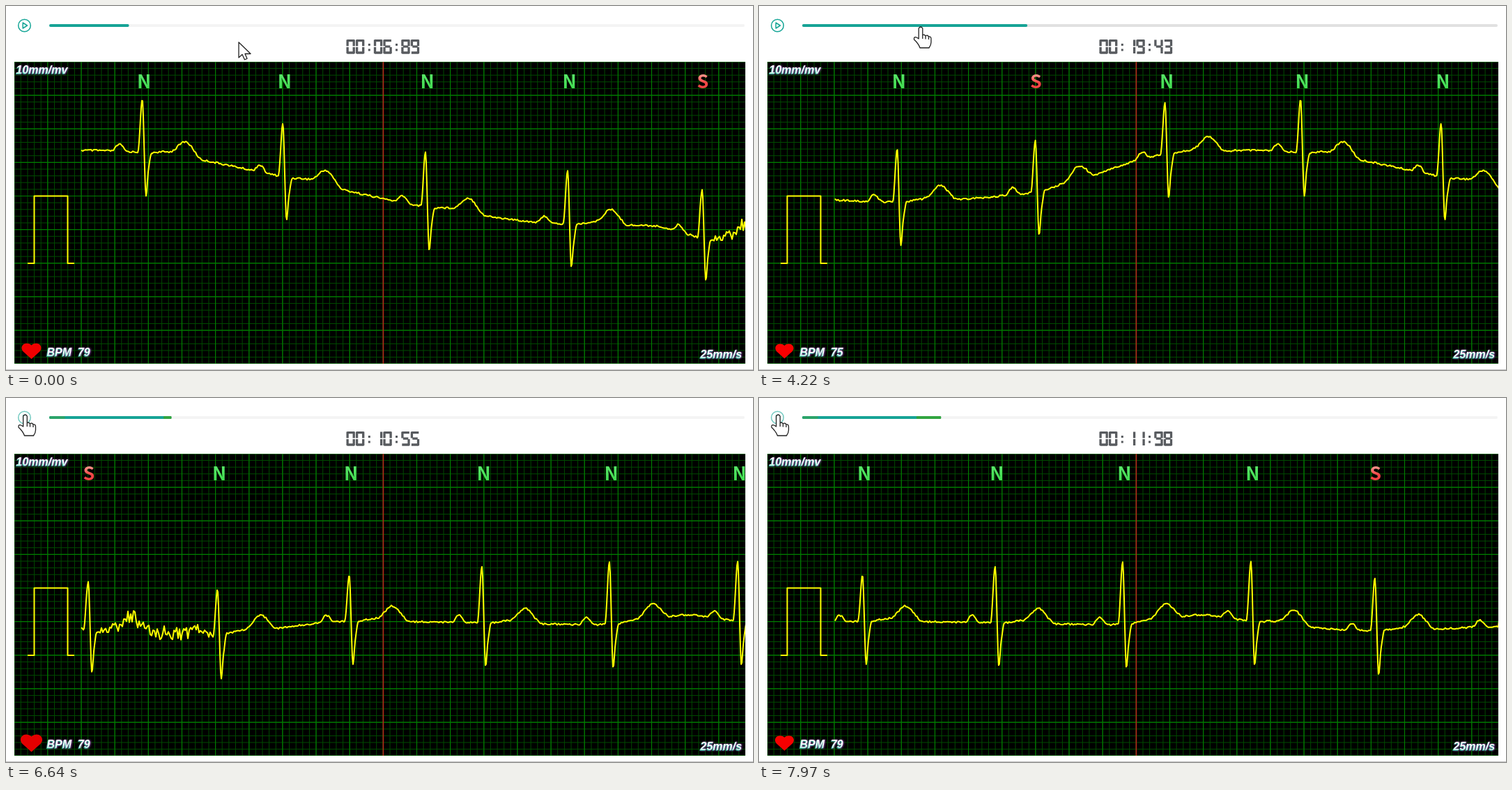
An HTML page for the animation above (8 s loop, 1072 by 522 pixels).

```html
<!DOCTYPE html>
<html lang="en">
<head>
<meta charset="utf-8">
<title>ECG player</title>
<style>
  html, body { margin: 0; width: 100%; height: 100%; overflow: hidden; background: #fff; }
  svg { display: block; width: 1072px; height: 522px; }
  .note { font: italic bold 16px "Liberation Sans", Arial, sans-serif; fill: url(#shine); white-space: pre;
    filter: drop-shadow(-1px 1px 0 #2a9f8c) drop-shadow(1px 0 1px #8d4aa8); }
  .beat { font: bold 27px "Noto Sans CJK SC", "Noto Sans CJK", Roboto, sans-serif; }
</style>
</head>
<body>
<svg viewBox="0 0 1072 522">
  <defs>
    <clipPath id="panel"><rect x="12" y="80" width="1049" height="433"/></clipPath>
    <linearGradient id="shine" x2="0" y2="1">
      <stop offset=".55" stop-color="#fff"/><stop offset=".85" stop-color="#b4f2e0"/>
    </linearGradient>
    <linearGradient id="N" gradientUnits="userSpaceOnUse" x1="0" y1="98" x2="0" y2="118">
      <stop stop-color="#58e668"/><stop offset="1" stop-color="#41dc50"/>
    </linearGradient>
    <linearGradient id="S" gradientUnits="userSpaceOnUse" x1="0" y1="98" x2="0" y2="118">
      <stop stop-color="#ff9a90"/><stop offset=".6" stop-color="#f04444"/>
    </linearGradient>
  </defs>

  <g id="button" fill="none" stroke="#17a697" stroke-width="1.5" stroke-linejoin="round">
    <circle cx="26.5" cy="28" r="8.8"/>
    <path id="icon"/>
  </g>
  <rect id="track" x="62" y="26" width="998" height="4" rx="2"/>
  <rect id="bar" x="62" y="26" height="4" rx="2" fill="#17a396"/>
  <g id="played" fill="#32a540">
    <rect x="62" y="26" width="23" height="4" rx="2" fill="#2ca46a"/>
    <rect id="playedBar" x="226" y="26" height="4" rx="1"/>
  </g>
  <path id="clock" fill="none" stroke="#585b5f" stroke-width="3.3"/>
  <path d="M519.8 54h3v3h-3zm0 7.5h3v3h-3zM559 54h3v3h-3zm0 7.5h3v3h-3z" fill="#585b5f"/>

  <rect x="12" y="80" width="1049" height="433"/>
  <g clip-path="url(#panel)" fill="none">
    <path id="minor" stroke="#004a00"/>
    <path id="major" stroke="#007c00" stroke-width="1.2"/>
    <path d="M541.4 80V514" stroke="#b3261a" stroke-width="1.6"/>
    <g stroke="#ff0" stroke-width="2" stroke-linejoin="round">
      <path d="M31 369H40.5V272.5H88.5V369H98"/>
      <path id="wave"/>
    </g>
    <g id="labels"></g>
    <path id="heart" d="M0 10.8L-11 1C-17 -6 -8 -14 0 -7.5C8 -14 17 -6 11 1Z"/>
  </g>
  <text class="note" x="14.5" y="97">10mm/mv</text>
  <text class="note" x="58.5" y="501.5" id="bpm"></text>
  <text class="note" x="996.5" y="505">25mm/s</text>
  <path d="M0 521.5H1072" stroke="#c4c4c4"/>

  <circle id="press" r="17.3" fill="#fdf73c" opacity=".72"/>
  <g id="cursor" fill="#fff" stroke="#222" stroke-width="1.3" stroke-linejoin="round">
    <path id="arrow" d="M0 0V22L5 17.5L8.5 25L12 23.5L9 16.5H17Z"/>
    <path id="hand" d="M-2.8 2Q0 -2 2.8 2V12Q5 10 7 13Q10 11 11.5 14Q15 13.5 15 17V22Q15 26 12 30H-1Q-3 24 -9.5 18Q-10 13 -5 15.5L-2.8 17ZM2.8 12V17M7 13V17.5M11.5 14V18"/>
  </g>
</svg>
<script>
const LOOP = 8000, SPEED = 240.7, START = 6.89, CELL = 48.15;
const PLAY_AT = 6030, TICK = 45.86;
const SPLICE = 2907, REPEAT = 3600;   // where the record breaks, and its length
const $ = id => document.getElementById(id);
const set = (id, attrs) => { for (const k in attrs) $(id).setAttribute(k, attrs[k]); };
const show = (node, on) => node.setAttribute('display', on ? 'inline' : 'none');

// Monotone cubic through a few points
function curve(points) {
  const d = points.slice(1).map((q, i) => (q[1] - points[i][1]) / (q[0] - points[i][0]));
  const m = points.map((_, i) => d[i - 1] * d[i] > 0 ? 2 * d[i - 1] * d[i] / (d[i - 1] + d[i]) : 0);
  return x => {
    const i = points.findIndex(q => q[0] > x) - 1;
    if (i < 0) return x < points[0][0] ? points[0][1] : points[points.length - 1][1];
    const [x0, y0] = points[i], [x1, y1] = points[i + 1], h = x1 - x0, u = (x - x0) / h, v = 1 - u;
    return y0 * (1 + 2 * u) * v * v + h * m[i] * u * v * v + y1 * u * u * (3 - 2 * u) - h * m[i + 1] * u * u * v;
  };
}

const peaks = [195.6, 397.3, 602, 806, 999, 1184.6, 1373.6, 1564, 1747, 1931, 2109, 2292,
  2467.5, 2650.5, 2833, 3018, 3216.7, 3415, 3601];
const supraventricular = [999, 2109, 2833, 3415];

// Slow wander of the baseline, before and after the splice
const driftBefore = curve([[108, 207], [198, 210], [399, 245], [604, 288], [809, 313], [925, 315], [1005, 332],
  [1187, 338], [1376, 320], [1747, 325], [1860, 311], [1931, 320], [2110, 334], [2294, 328], [2653, 350], [2840, 374]]);
const driftAfter = curve([[SPLICE, 256], [2951, 258], [3020, 270], [3219, 281], [3415, 267], [3603, 213], [3700, 208]]);

// R height swells and fades in the middle of the record
const rHeight = x => 75 - 17 * Math.exp(-(((x - 1550) / 700) ** 2)) * Math.cos((x - 1190) / 197);
const beatPoints = r => [
  [-44, 0], [-33, -10], [-21, 0], [-6.5, 0], [0, -rHeight(r)], [5.3, 62], [8.5, 28], [13.5, 0],
  [41, -5], [62, -22], [87, 0]
].map(([dx, dy]) => [r + dx, dy]);
const pulse = curve(peaks.flatMap(beatPoints));

const random = k => { const v = Math.sin(k * 12.9898) * 43758.5453; return (v - Math.floor(v)) * 2 - 1; };
const roughness = x => 1.3 + 8.5 * Math.exp(-(((x - 1095) / 85) ** 4));
const noise = x => (random(x >> 1) + random((x + 1) >> 1)) / 2;
function height(x) {
  if (x > REPEAT + 100) x -= REPEAT;
  return (x < SPLICE ? driftBefore : driftAfter)(x) + pulse(x) + roughness(x) * noise(x);
}
const samples = Array.from({ length: 4200 }, (_, x) => height(x));

const labels = [...peaks, ...peaks.slice(0, 2).map(x => x + REPEAT)].map(x => {
  const node = document.createElementNS('http://www.w3.org/2000/svg', 'text');
  const kind = supraventricular.includes(x) ? 'S' : 'N';
  node.textContent = kind;
  node.setAttribute('class', 'beat');
  node.setAttribute('y', 118);
  node.setAttribute('fill', `url(#${kind})`);
  $('labels').append(node);
  return { x, node };
});

function grid(step) {
  let d = '';
  for (let x = 11.7; x < 1062; x += step) d += `M${x.toFixed(1)} 80V514`;
  for (let y = 79.9; y < 514; y += step) d += `M11 ${y.toFixed(1)}H1062`;
  return d;
}
set('minor', { d: grid(CELL / 5) });
set('major', { d: grid(CELL) });

const segments = {
  a: 'm1 1.6h10.5', b: 'm10.7 .6v8.8', c: 'm10.7 11v9', d: 'm1 19h10.5',
  e: 'm1.6 11v9', f: 'm1.6 .6v8.8', g: 'm2.5 10.2h7.5'
};
const digits = 'abcdef bc abdeg abcdg bcfg acdfg acdefg abcf abcdefg abcdfg'.split(' ');
function clockPath(seconds) {
  const text = String(Math.round(seconds * 100)).padStart(6, '0');
  return [...text].map((digit, i) => [...digits[digit]]
    .map(s => `M${488.5 + 13.5 * (i % 2) + 39.4 * (i >> 1)} 48${segments[s]}`).join('')).join('');
}

// Keys are [time, ...values]
function tween(keys, t, ease = u => u) {
  const i = keys.findIndex(k => k[0] > t);
  if (i < 1) return (i ? keys[keys.length - 1] : keys[0]).slice(1);
  const a = keys[i - 1], b = keys[i], u = ease((t - a[0]) / (b[0] - a[0]));
  return a.slice(1).map((v, k) => v + (b[k + 1] - v) * u);
}
const smooth = u => u * u * (3 - 2 * u);

const pointerKeys = [
  [300, 334, 52], [760, 335, 30], [1400, 339, 29], [2500, 339, 29], [2860, 385, 28], [3450, 384, 29],
  [4150, 232, 30], [4220, 232, 30], [4380, 226, 27], [4970, 226, 27], [5650, 27.5, 24]
];
const presses = [1850, 2900, 4400, 5790];
const playKeys = [[PLAY_AT, 9.9], [6640, 10.55], [7100, 11.08], [7970, 11.98]];
const states = [
  { from: 0, time: START, bpm: 79, beatAt: -106 },
  { from: 1950, time: 16.72, bpm: 71, beatAt: 1907 },
  { from: 3000, time: 19.43, bpm: 75, beatAt: 4020 },
  { from: 4500, time: 9.9, bpm: 79, beatAt: 5836 }
];

function playhead(t, state) {
  if (t < PLAY_AT) return state.time;
  return tween(playKeys, 6640 + TICK * Math.floor((t - 6640) / TICK + .01))[0];
}

function drawTrace(seconds) {
  const offset = (seconds - START) * SPEED;
  let d = '';
  for (let x = Math.ceil(offset + 108); x < offset + 1063; x++)
    d += `${d ? 'L' : 'M'}${(x - offset).toFixed(1)} ${samples[x].toFixed(1)}`;
  set('wave', { d });
  for (const { x, node } of labels) {
    const at = x - offset;
    show(node, at > 108 && at < 1080);
    node.setAttribute('x', (at - 7.6).toFixed(1));
  }
}

function drawHeart(t, { bpm, beatAt }) {
  const beat = (t - beatAt) * bpm / 60000;
  const swell = Math.exp(-8.5 * Math.abs(beat - Math.round(beat)));
  set('heart', {
    transform: `translate(36.5 494.5) scale(${.96 + .4 * swell})`,
    fill: `rgb(${Math.round(255 - 45 * swell)} 0 0)`
  });
  $('bpm').textContent = `BPM  ${bpm}`;
}

function drawPointer(t) {
  const [x, y] = tween(pointerKeys, t, smooth);
  const onSlider = x > 60 && y > 18 && y < 37, onButton = x < 38;
  show($('hand'), onSlider || onButton);
  show($('arrow'), !onSlider && !onButton);
  set('cursor', { transform: `translate(${x} ${y})` });
  set('track', { fill: onSlider ? '#e1e1e1' : '#f4f4f4' });
  set('button', { opacity: onButton ? .6 : 1 });
  set('press', { cx: x + .5, cy: y + .5 });
  show($('press'), presses.some(at => t >= at && t < at + 250));
}

function render(t) {
  const state = states.filter(s => s.from <= t).pop();
  const seconds = playhead(t, state);
  const width = seconds * 998 / 60;
  set('bar', { width });
  show($('played'), t >= 5790);
  set('playedBar', { width: Math.max(0, width - 164) });
  set('clock', { d: clockPath(seconds) });
  set('icon', { d: t < PLAY_AT ? 'M24.2 24V32L30.5 28Z' : 'M24.6 24V32M28.6 24V32' });
  drawTrace(seconds);
  drawHeart(t, state);
  drawPointer(t);
}

let begin;
function frame(now) {
  begin ??= now;
  render((now - begin) % LOOP);
  requestAnimationFrame(frame);
}
render(0);
requestAnimationFrame(frame);
</script>
</body>
</html>
```
